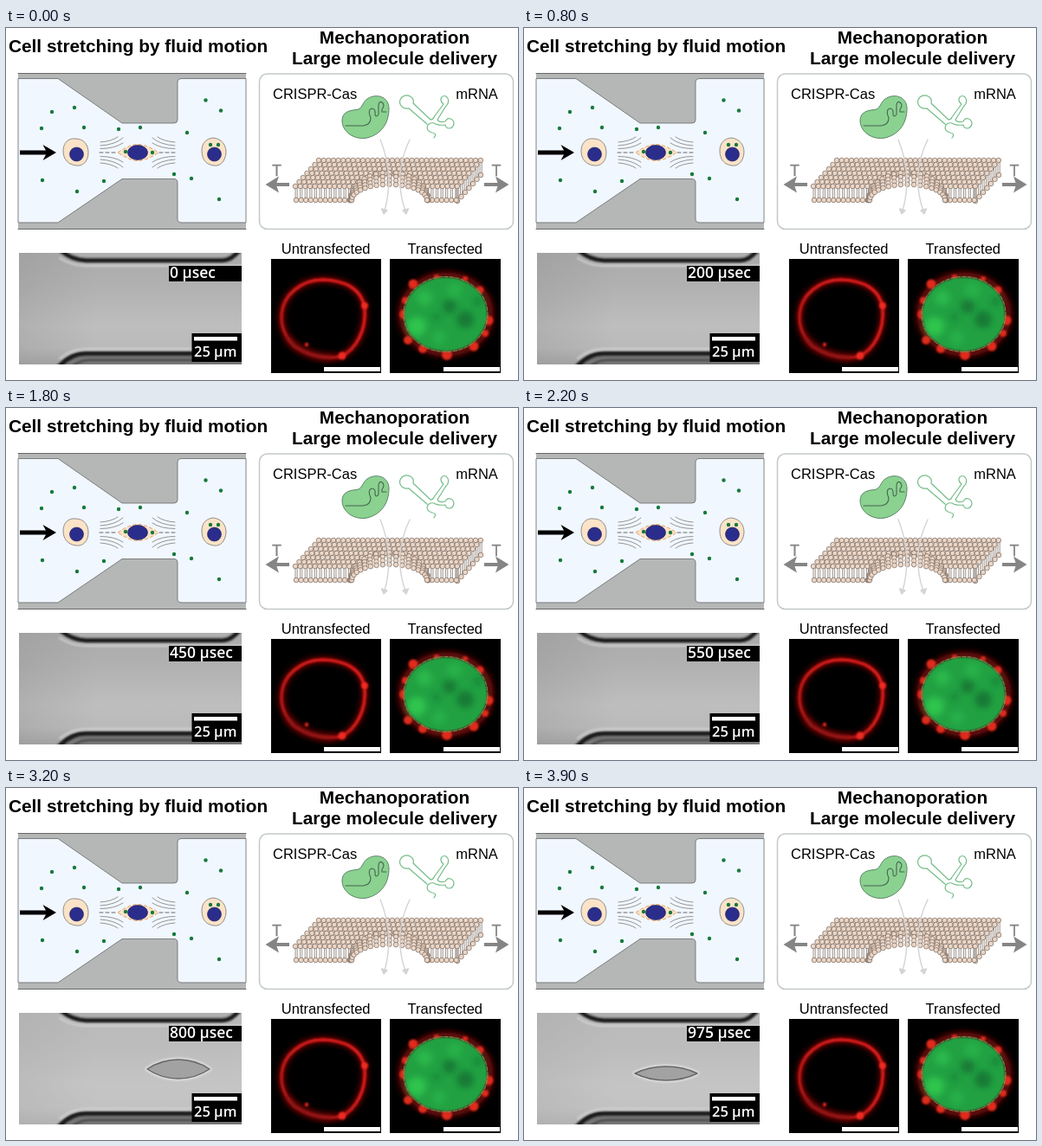
An HTML page that plays this animation: 591x407 px, repeating every 4000 ms.

```html
<!DOCTYPE html>
<html lang="en">
<head>
<meta charset="utf-8">
<title>Cell stretching and delivery</title>
<style>
html, body { margin: 0; width: 100%; height: 100%; overflow: hidden; background: #fff; }
svg { display: block; }
text { font: 16.5px "Liberation Sans", Arial, sans-serif; }
.title { font-size: 20.8px; font-weight: bold; }
.pull { font-size: 18px; fill: #858585; stroke: #858585; stroke-width: .3; }
.stamp { font: 600 17.5px "Open Sans", sans-serif; fill: #fff; }
.scale { font-size: 16.5px; }
.line { fill: none; stroke-linecap: round; stroke-linejoin: round; }
</style>
</head>
<body>
<svg width="591" height="407" viewBox="0 0 591 407">
<defs>
  <filter id="soft" x="-30%" y="-30%" width="160%" height="160%"><feGaussianBlur stdDeviation="1"/></filter>
  <filter id="fog" x="-50%" y="-50%" width="200%" height="200%"><feGaussianBlur stdDeviation="3.5"/></filter>
  <linearGradient id="field" x1="0" y1="0" x2="0" y2="1">
    <stop offset="0" stop-color="#aaa"/><stop offset=".3" stop-color="#b1b1b1"/>
    <stop offset=".65" stop-color="#bebebe"/><stop offset=".85" stop-color="#bababa"/><stop offset="1" stop-color="#a6a6a6"/>
  </linearGradient>
  <linearGradient id="side"><stop offset="0" stop-color="#888" stop-opacity=".25"/><stop offset=".35" stop-color="#888" stop-opacity="0"/></linearGradient>
  <linearGradient id="ringtone" x1="0" y1="1" x2="1" y2="0"><stop offset="0" stop-color="#9c1212"/><stop offset=".6" stop-color="#dc1c1a"/></linearGradient>
</defs>

<text class="title" x="3" y="28">Cell stretching by fluid motion</text>
<g text-anchor="middle">
  <text class="title" x="448.5" y="18">Mechanoporation</text>
  <text class="title" x="448.5" y="42">Large molecule delivery</text>
</g>

<!-- channel -->
<path fill="#b5b7b7" d="M14 52H277V233H14z"/>
<path fill="#f1f7fe" stroke="#666" stroke-width=".8" d="M14 58.500H60L134 110H194Q198 110 198 106V63Q198 58.500 203 58.500H277V225H203Q198 225 198 221V179Q198 174.500 194 174.500H134L60 225H14z"/>
<path class="line" stroke="#666" d="M14 52.500H277M14 232.500H277"/>
<path d="M16 141.500H46L42.500 135L58 144L42.500 153L46 146.500H16z"/>
<g id="flow" class="line" stroke="#8a8a8a" stroke-width=".9"></g>
<g stroke="#777" stroke-width=".8" fill="#fbe3c8">
  <path d="M66 142C66 133 72 127 80 128C90 128 95 135 95 144C95 155 88 160 81 159C72 158 66 152 66 142z"/>
  <path d="M226 142C226 133 231 128 239 127C249 128 254 135 254 144C253 155 247 160 240 159C231 158 226 152 226 142z"/>
  <path d="M129 144Q142 135 152 134.500Q163 135 176 144Q163 153 152 153.500Q142 153 129 144z" stroke="#e08a3c" stroke-dasharray="4 2.500"/>
</g>
<g fill="#2b2d8c" stroke="#1a1a55" stroke-width=".6">
  <ellipse cx="81.500" cy="146" rx="8" ry="8"/>
  <ellipse cx="152" cy="144" rx="11.500" ry="8.500"/>
  <ellipse cx="240.500" cy="146" rx="8" ry="8"/>
</g>
<g id="dots" fill="#157a3c"></g>

<!-- membrane panel -->
<rect x="292.500" y="53" width="293" height="179.500" rx="9" fill="#fff" stroke="#c3cac6" stroke-width="1.500"/>
<text x="308" y="82">CRISPR-Cas</text>
<text x="519.300" y="82">mRNA</text>
<path fill="#8bd291" stroke="#4f7a58" stroke-width=".9" d="M388 107C388 97 397 95 405 94.500C412 93 411 86 417 82C427 75 442 79 442 93C442 107 436 122 417 127C402 130 388 120 388 107z"/>
<path class="line" stroke="#47664f" stroke-width="1.100" d="M392 113H412Q421 112 421 104Q417 95 422 93Q427 93 426 100Q427 104 430 100V89Q431 84 434 86Q438 89 434 94V97H439"/>
<g class="line" stroke="#74bd88" stroke-width="1.200">
  <path d="M465 93C455 94 452 85 457 80C463 75 472 80 470 87L490 106Q493 106 494 103L505 88C499 83 503 77 508 79C512 82 511 88 508 90L498 106Q500 110 507 108C510 102 517 105 517 111C515 118 508 117 507 112Q498 113 494 110Q490 109 487 112Q484 119 492 121Q498 122 494 127"/>
  <path d="M465 93L486 111"/>
</g>
<g id="membrane" stroke="#75665c" stroke-width=".7" fill="#ecd6c6"></g>
<g class="line" stroke="#d4d4d4" stroke-width="1.400">
  <path d="M432 129Q449 171 436.500 213M466 129Q446 171 461.500 213"/>
  <path fill="#d4d4d4" d="M433.500 209L436 215L440 211zM458 211L462 215L464.500 209z"/>
</g>
<path fill="#858585" d="M299.500 181L315 171.500L312.500 179H327V183H312.500L315 190.500zM580.500 181L565 171.500L567.500 179H552V183H567.500L565 190.500z"/>
<text class="pull" x="307" y="171">T</text>
<text class="pull" x="560.500" y="171">T</text>

<!-- microscope view -->
<svg x="15" y="260" width="257" height="129" viewBox="15 260 257 129">
  <path fill="url(#field)" d="M15 260H272V389H15z"/>
  <path fill="url(#side)" d="M15 260H272V389H15z"/>
  <path id="haze" fill="#d0d0d0" d="M15 260H272V389H15z"/>
  <g filter="url(#soft)">
    <path fill="#b0b0b0" d="M62 255Q76 270 92 270H250Q260 268 268 255z"/>
    <path fill="#777" d="M62 394Q76 376 92 376H280V394z"/>
    <path class="line" stroke="#d2d2d2" stroke-width="2" d="M62 266Q76 275 92 275H280M62 382Q76 371 92 371H280"/>
    <path class="line" stroke="#1a1a1a" stroke-width="5.500" d="M62 256Q76 268 92 268.500H250Q260 268 268 258M60 393Q74 376.500 92 376.500H280"/>
    <path class="line" stroke="#444" stroke-width="2.500" d="M74 393Q84 384 96 384H280"/>
  </g>
  <g stroke-linejoin="round"><g class="cell"></g><g class="cell"></g></g>
  <path d="M188 275H272V293H188zM214.500 353H272V386H214.500z"/>
  <path fill="#fff" d="M217 357H267V361.500H217z"/>
  <text id="clock" class="stamp" x="189" y="289">0 µsec</text>
  <text class="stamp scale" x="217" y="380">25 µm</text>
</svg>

<!-- fluorescence -->
<text x="317.800" y="260.500">Untransfected</text>
<text x="463.500" y="260.500">Transfected</text>
<svg x="306" y="267" width="127" height="132" viewBox="306 267 127 132">
  <path d="M306 267H433V399H306z"/>
  <g fill="none">
    <path id="ring" d="M318 335C318 308 342 291 366 291C392 292 411 302 414 324C416 350 404 372 386 380C362 384 345 376 333 368C323 358 318 348 318 335z" stroke="#a01010" stroke-width="5" filter="url(#fog)"/>
    <path d="M318 335C318 308 342 291 366 291C392 292 411 302 414 324C416 350 404 372 386 380C362 384 345 376 333 368C323 358 318 348 318 335z" stroke="url(#ringtone)" stroke-width="3.600" filter="url(#soft)"/>
  </g>
  <path class="line" d="M326 360Q345 380 376 381" stroke="#7a0e0e" stroke-width="7" opacity=".7" filter="url(#fog)"/>
  <g filter="url(#soft)" fill="#ee2a20">
    <circle cx="414" cy="321" r="4"/><circle cx="388" cy="379" r="4.500"/><circle cx="347" cy="366" r="2.200"/>
  </g>
  <path fill="#fff" d="M367 392H432V397H367z"/>
</svg>
<svg x="443" y="267" width="128" height="132" viewBox="443 267 128 132">
  <path d="M443 267H571V399H443z"/>
  <ellipse cx="508" cy="331" rx="51" ry="45" fill="none" stroke="#8a1010" stroke-width="7" filter="url(#fog)"/>
  <g id="spots" fill="#e02a1a" filter="url(#soft)"></g>
  <ellipse cx="507.500" cy="331" rx="48" ry="43" fill="#20a142" filter="url(#soft)"/>
  <g id="blotches" filter="url(#fog)"></g>
  <ellipse cx="507.500" cy="331" rx="48.500" ry="43.500" fill="none" stroke="#a8845a" stroke-width=".9" stroke-dasharray="5 1.500"/>
  <path fill="#fff" d="M505 392H570V397H505z"/>
</svg>
</svg>

<script>
const $ = id => document.getElementById(id);
const disc = (x, y, r, extra = '') => `<circle cx="${x}" cy="${y}" r="${r}" ${extra}/>`;
const discs = (list, r) => list.map(([x, y, s = r]) => disc(x, y, s)).join('');

$('dots').innerHTML = discs([
  [53, 97], [79, 92], [41, 116], [90, 115], [130, 117], [155, 115], [230.5, 83.5], [248, 95.5],
  [209, 121], [42, 176], [82, 189], [113, 177], [194, 169], [214, 174], [246, 198],
  [138, 143], [169, 144], [236, 135], [245, 135]
], 2.2);

// One quarter of the streamlines, mirrored about the middle cell
const quarter = '<path d="M-43 -8Q-26 -9 -17 -17M-43 -12Q-30 -13 -23 -18M-43 -4.5Q-27 -4.500 -17 -11"/>';
$('flow').innerHTML = [[1, 1], [-1, 1], [1, -1], [-1, -1]]
  .map(([a, b]) => `<g transform="translate(152 144) scale(${a} ${b})">${quarter}</g>`).join('') +
  '<path stroke="#555" stroke-dasharray="4 3" d="M108 144H127M177 144H196"/>';

function membrane() {
  const bead = (x, y) => disc(x.toFixed(1), y.toFixed(1), 2.8);
  const tails = (x, y, h) => `<path fill="none" d="M${x - 1} ${y}v${h}M${x + 1.2} ${y}v${h}"/>`;
  let out = '';
  // right face
  for (let i = 0; i <= 6; i++) {
    const x = 548 - i * 4.5, y = 153 + i * 5;
    out += tails(x, y, 17) + bead(x, y + 17);
  }
  // front face, left and right of the pore
  for (let x = 335; x < 523; x += 5.6) {
    if (x > 399 && x < 485) continue;
    out += tails(x, 183, 16) + bead(x, 199);
  }
  // top sheet
  for (let r = 0; r < 7; r++)
    for (let i = 0; i < 34; i++) out += bead(361 - r * 4.5 + i * 5.66, 153 + r * 5);
  out += '<path fill="#fff" stroke="none" d="M400 204A42 32 0 0 1 485 204z"/>';
  // curled rim of the pore
  for (let k = 0; k < 4; k++)
    for (let i = 0; i <= 18; i++) {
      const a = Math.PI * i / 18;
      out += bead(442.5 - (45 - k * .5) * Math.cos(a), 199 - (32 - k * 4.6) * Math.sin(a));
    }
  return out;
}
$('membrane').innerHTML = membrane();

$('blotches').innerHTML = [
  [474, 345, 11, '#2fc44e'], [483, 312, 9, '#2bb84c'], [518, 303, 9, '#28b049'], [500, 358, 8, '#28b049'],
  [512, 322, 8, '#147a34'], [530, 337, 10, '#147a34'], [545, 316, 6, '#188a3a'], [497, 334, 5, '#188a3a']
].map(([x, y, r, c]) => disc(x, y, r, `fill="${c}"`)).join('');
$('spots').innerHTML = discs([
  [470, 296, 5.5], [461, 315, 4], [460, 331, 6], [464, 361, 5], [481, 371, 5],
  [509, 378, 6], [540, 368, 5.5], [553, 353, 4], [557, 338, 5.5], [547, 303, 4.5], [530, 290], [497, 288]
], 3);

// Passing cells: step and place at which each one is centred in the throat
const passes = [{ step: 32, x: 199, y: 325, h: 11 }, { step: 39, x: 164, y: 330, h: 8 }];
const cells = document.querySelectorAll('.cell');
const STEP = 100, LOOP = 4000, SPEED = 52;

function drawCell(el, p, n) {
  const x = p.x + (n - p.step) * SPEED;
  const stretch = Math.min(1, Math.max(0, (x - 40) / 90));
  const w = 19 + 17 * stretch, h = 17 + (p.h - 17) * stretch;
  const k = w * (1 - .6 * stretch), b = h * 4 / 3;
  const d = `M${-w} 0C${-k} ${-b} ${k} ${-b} ${w} 0C${k} ${b} ${-k} ${b} ${-w} 0z`;
  el.innerHTML = `<path d="${d}" fill="none" stroke="#dedede" stroke-width="5" filter="url(#soft)"/>
    <path d="${d}" fill="#a2a2a2" stroke="#666" stroke-width="1.4"/>`;
  el.setAttribute('transform', `translate(${x} ${p.y})`);
  el.style.display = x > -10 && x < 310 ? '' : 'none';
}

let shown = -1;
function draw(now) {
  const n = Math.floor(now % LOOP / STEP);
  if (n !== shown) {
    shown = n;
    $('clock').textContent = `${n * 25} µsec`;
    $('haze').style.opacity = n >= 29 ? .35 : 0;
    passes.forEach((p, i) => drawCell(cells[i], p, n));
  }
  requestAnimationFrame(draw);
}
draw(performance.now());
</script>
</body>
</html>
```
